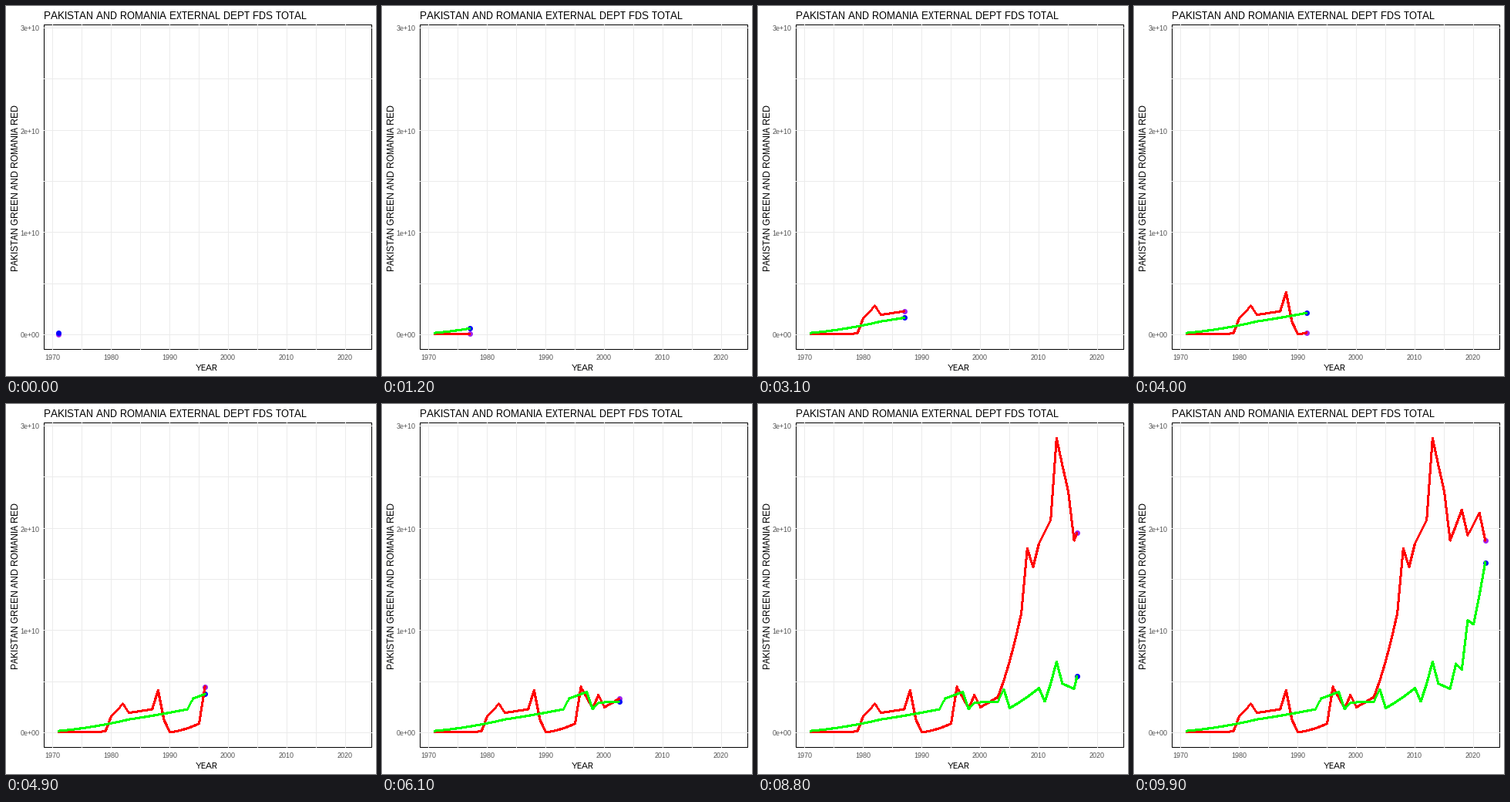
These frames come from a looping animation (480 by 480 pixels, 10 s). A matplotlib script:

```python
import numpy as np
import matplotlib.pyplot as plt
from matplotlib.animation import FuncAnimation
from matplotlib.collections import LineCollection
from matplotlib.patches import Rectangle

SIZE, DPI = 480, 96
PX = 72 / DPI
FRAMES, INTERVAL = 100, 100
FIRST, LAST = 1971, 2022

plt.rcParams.update({
    "font.family": "Liberation Sans",
    "text.hinting": "native",
    "text.hinting_factor": 1,
    "path.snap": False,
})

# Turning points as (year, billions); growth between them is quadratic
ROMANIA = [
    (1971, .04), (1979, .12), (1980, 1.6), (1982, 2.85), (1983, 1.95),
    (1987, 2.3), (1988, 4.15), (1990, .05), (1995, .9), (1996, 4.5),
    (1998, 2.4), (1999, 3.7), (2000, 2.5), (2003, 3.5), (2007, 11.7),
    (2008, 18), (2009, 16.2), (2010, 18.5), (2012, 20.8), (2013, 28.8),
    (2015, 23.6), (2016, 18.8), (2018, 21.8), (2019, 19.3), (2021, 21.5),
    (2022, 18.8)]
PAKISTAN = [
    (1971, .18), (1983, 1.3), (1993, 2.3), (1994, 3.35), (1997, 4),
    (1998, 2.3), (1999, 2.95), (2003, 3.05), (2004, 4.25), (2005, 2.4),
    (2010, 4.35), (2011, 3.05), (2013, 6.95), (2014, 4.8), (2016, 4.3),
    (2017, 6.75), (2018, 6.15), (2019, 11), (2020, 10.6), (2022, 16.65)]

years = np.arange(FIRST, LAST + 1)

# Each year lands on a whole frame; in-between frames are interpolated
key_frames = np.round((years - FIRST) * (FRAMES - 1) / (LAST - FIRST))


def x_px(year):
    return 60.5 + 7.6 * (year - 1970)


def y_px(value):
    return 426.5 - 13.27 * value


def pixel(v):
    return np.floor(v) + .5


fig = plt.figure(figsize=(SIZE / DPI, SIZE / DPI), dpi=DPI, facecolor="white")
ax = fig.add_axes([0, 0, 1, 1])
ax.set(xlim=(0, SIZE), ylim=(SIZE, 0))
ax.axis("off")


def label(x, y, text, size, color="black", **kw):
    ax.text(x, y, text, fontsize=size * PX, color=color, **kw)


def grid_line(xs, ys):
    ax.plot(xs, ys, color="#ebebeb", lw=PX, zorder=1.5,
            solid_capstyle="butt")


ax.add_patch(Rectangle((49.5, 24.5), 425, 421, fill=False, ec="black",
                       lw=PX, zorder=1))
for year in range(1970, 2021, 5):
    x = pixel(x_px(year))
    grid_line([x, x], [24, 446])
    if year % 10 == 0:
        label(x - .5, 459, str(year), 9, "#4d4d4d", ha="center")
for value in range(0, 31, 5):
    y = pixel(y_px(value))
    grid_line([49, 475], [y, y])
    if value % 10 == 0:
        label(43.5, y + 4, f"{value // 10}e+{10 if value else 0:02d}", 9,
              "#4d4d4d", ha="right")

label(49, 17, "PAKISTAN AND ROMANIA EXTERNAL DEPT FDS TOTAL", 13)
label(260.5, 473, "YEAR", 11, ha="center")
label(18, 236.5, "PAKISTAN GREEN AND ROMANIA RED", 11.7, rotation=90,
      ha="right", va="center")


class Series:
    def __init__(self, points, line_color, dot_color, z):
        key_years, values = np.transpose(points)
        self.x = x_px(years)
        self.y = y_px(np.interp(years, key_years, np.sqrt(values)) ** 2)
        slope = np.abs(np.diff(self.y) / np.diff(self.x))
        # Aliased strokes look thinner on near-diagonal segments
        widths = np.where((slope > 1) & (slope < 2.1), 1.4, 2) * PX
        self.line = LineCollection([], colors=line_color, linewidths=widths,
                                   antialiaseds=False, capstyle="round",
                                   zorder=z + 2)
        ax.add_collection(self.line, autolim=False)
        self.dot, = ax.plot([], [], "o", color=dot_color, ms=7 * PX, mew=0,
                            zorder=z)

    def reveal(self, frame):
        x = np.interp(frame, key_frames, self.x)
        y = np.interp(frame, key_frames, self.y)
        past = key_frames < frame
        pts = np.column_stack([np.append(self.x[past], x),
                               np.append(self.y[past], y)])
        self.line.set_segments(list(np.stack([pts[:-1], pts[1:]], axis=1)))
        self.dot.set_data([x], [y])
        return self.line, self.dot


series = [Series(ROMANIA, "#ff0000", "#a020f0", 2),
          Series(PAKISTAN, "#00ff00", "#0000ff", 3)]


def update(frame):
    return [artist for s in series for artist in s.reveal(frame)]


anim = FuncAnimation(fig, update, frames=FRAMES, interval=INTERVAL,
                     repeat=True, repeat_delay=0)
plt.show()
```
